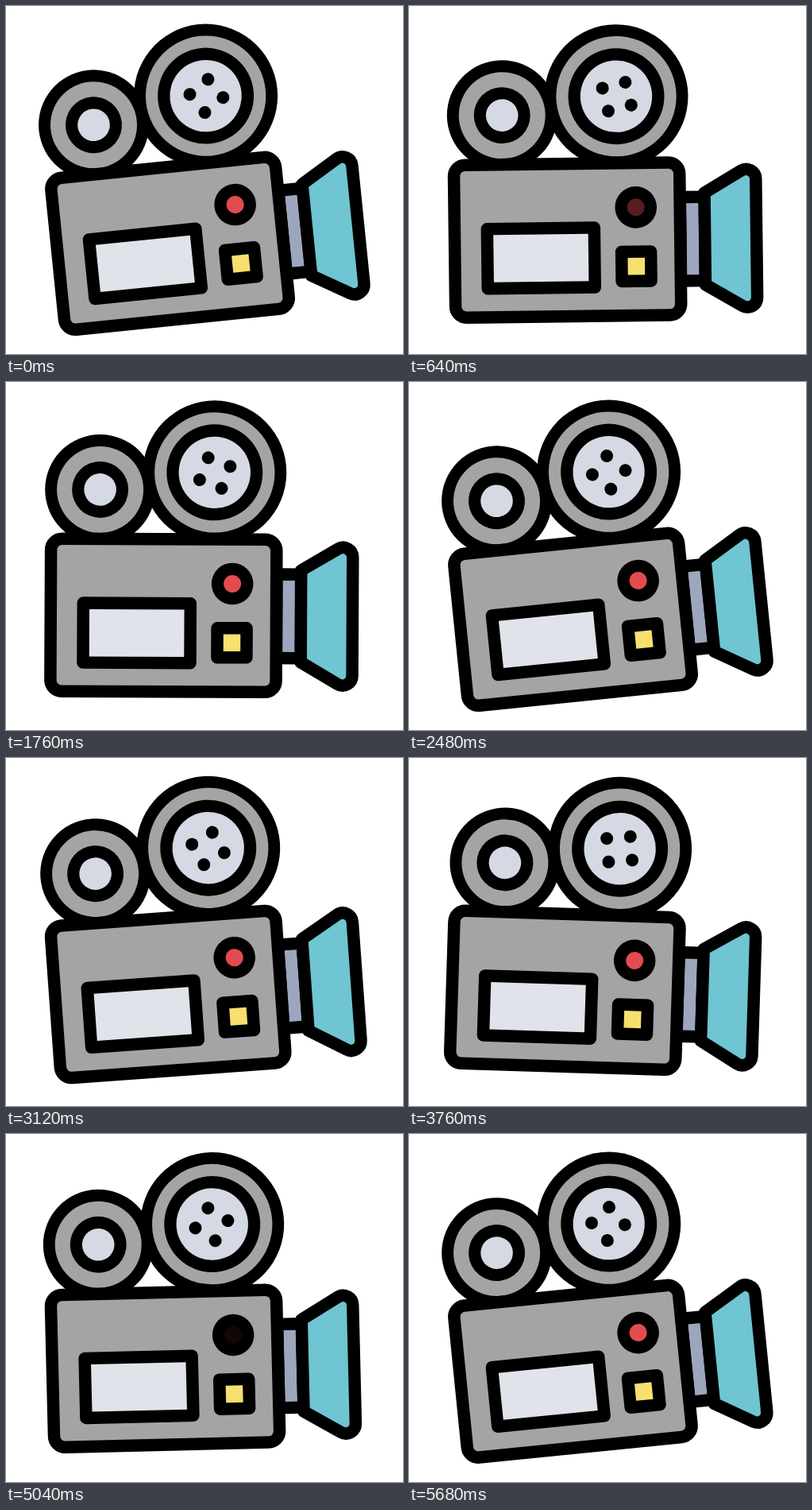
Animation of 500x438 px, one loop 5.76 s. Source, as an HTML page:

```html
<!DOCTYPE html>
<html lang="en">
<head>
<meta charset="utf-8">
<title>Film camera</title>
<style>
  html, body { margin: 0; width: 100%; height: 100%; overflow: hidden; background: #fff; }
  svg { display: block; width: 100%; height: 100%; }
  .line { stroke: #000; stroke-width: 15.5; stroke-linejoin: round; }
</style>
</head>
<body>
<svg viewBox="0 0 500 438">
  <g id="camera">
    <g transform="translate(118.2 136)">
      <circle r="69.4"/>
      <circle r="54.5" fill="#a5a3a4"/>
      <circle r="35.5"/>
      <circle r="20.3" fill="#d4d9e4"/>
    </g>
    <g transform="translate(262.3 113.8)">
      <circle r="90.5"/>
      <circle r="75.7" fill="#a5a3a4"/>
      <circle r="60.5"/>
      <circle r="45.2" fill="#d4d9e4"/>
      <g id="holes">
        <g transform="translate(.8 0)">
          <circle cx="21" r="8"/>
          <circle cx="-21" r="8"/>
          <circle cy="21" r="8"/>
          <circle cy="-21" r="8"/>
        </g>
      </g>
    </g>
    <rect class="line" x="341" y="241.7" width="31" height="105.4" fill="#9ca7be"/>
    <path class="line" fill="#6fc5d1"
      d="M371.8 236.6L418.3 209.2A12.25 12.25 0 0 1 436.8 219.7V369.1A12.25 12.25 0 0 1 418.3 379.6L371.8 352.2Z"/>
    <rect class="line" x="56.6" y="198" width="284.2" height="192" rx="14" fill="#a5a3a4"/>
    <rect class="line" x="97.6" y="278.8" width="135" height="75" fill="#e1e3ea"/>
    <circle cx="285.3" cy="253.8" r="26.3"/>
    <circle id="lamp" cx="285.3" cy="253.8" r="11" fill="#e34b50"/>
    <rect class="line" x="266.5" y="309.6" width="37" height="37" fill="#f7e06e"/>
  </g>
</svg>
<script>
  const LOOP = 5760, STEP = 80;
  const camera = document.getElementById('camera');
  const holes = document.getElementById('holes');
  const lamp = document.getElementById('lamp');

  // One swing away from rest and back, between two times.
  function swing(t, from, to) {
    const p = Math.min(1, Math.max(0, (t - from) / (to - from)));
    return (1 - Math.cos(2 * Math.PI * p)) / 2;
  }

  function tilt(t) {
    return -5.8 + 9.7 * (swing(t, 0, 2480) + swing(t, 2700, LOOP));
  }

  // The lamp dims briefly once every quarter of the loop.
  function glow(t) {
    return 1 - swing(t % (LOOP / 4), 566, 826);
  }

  function draw(t) {
    camera.setAttribute('transform', `rotate(${tilt(t)} 250 219)`);
    holes.setAttribute('transform', `rotate(${11.2 + 180 * t / LOOP})`);
    lamp.setAttribute('opacity', glow(t));
  }

  function tick(now) {
    draw(Math.floor((now % LOOP) / STEP) * STEP);
    requestAnimationFrame(tick);
  }

  draw(0);
  requestAnimationFrame(tick);
</script>
</body>
</html>
```
